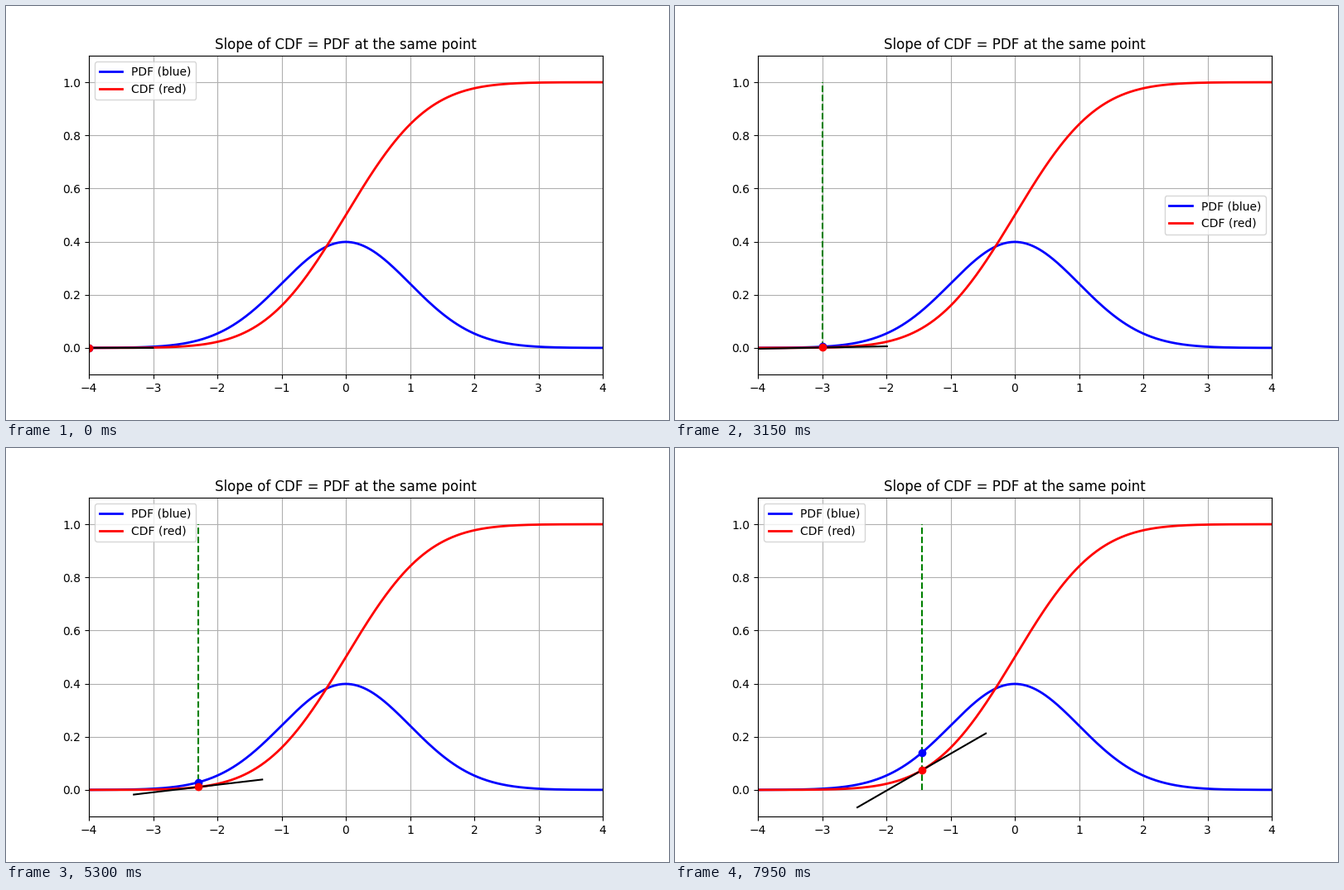
A matplotlib script that plays this animation: 800 px wide and 500 px high, repeating every 8 s.

```python
import math

import matplotlib.pyplot as plt
import numpy as np
from matplotlib.animation import FuncAnimation

FRAMES = 160
INTERVAL = 50

x = np.linspace(-4, 4, 500)
pdf = np.exp(-x**2 / 2) / math.sqrt(2 * math.pi)
cdf = np.array([0.5 * (1 + math.erf(v / math.sqrt(2))) for v in x])

fig, ax = plt.subplots(figsize=(8, 5), dpi=100)
ax.plot(x, pdf, "b-", lw=2, label="PDF (blue)")
ax.plot(x, cdf, "r-", lw=2, label="CDF (red)")
vline, = ax.plot([], [], "g--", lw=1.5)
tangent, = ax.plot([], [], "k-", lw=1.5)
pdf_dot, = ax.plot([], [], "bo")
cdf_dot, = ax.plot([], [], "ro")

ax.set_xlim(-4, 4)
ax.set_ylim(-0.1, 1.1)
ax.set_title("Slope of CDF = PDF at the same point")
ax.grid(True)
# "best" moves the legend out of the way of the sweeping line
ax.legend(loc="best")


def update(i):
    x0, slope, y0 = x[i], pdf[i], cdf[i]
    vline.set_data([x0, x0], [0, 1])
    tangent.set_data([x0 - 1, x0 + 1], [y0 - slope, y0 + slope])
    pdf_dot.set_data([x0], [slope])
    cdf_dot.set_data([x0], [y0])
    return vline, tangent, pdf_dot, cdf_dot


anim = FuncAnimation(fig, update, frames=FRAMES, interval=INTERVAL,
                     repeat=True, repeat_delay=0, blit=False)
plt.show()
```
